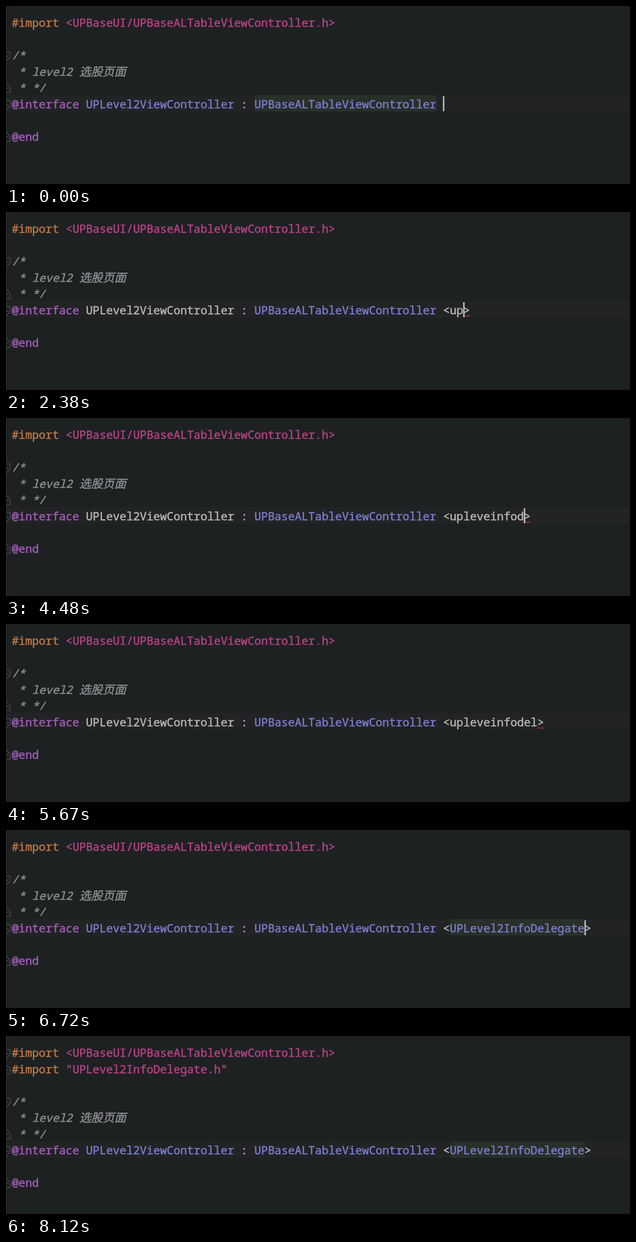
An HTML page for the animation above (8.19 s loop, 1280x367 px).

```html
<!DOCTYPE html>
<html lang="en">
<head>
<meta charset="utf-8">
<title>Code completion</title>
<style>
html, body { margin: 0; width: 100%; height: 100%; overflow: hidden; background: #1e2122; }
svg { display: block; width: 1280px; height: 367px; }
text { font: 23.04px "Noto Sans Mono", "DejaVu Sans Mono", monospace; white-space: pre; stroke-width: 0.6px; }
.comment { font-style: italic; }
.cjk { font: italic 24px "Noto Sans CJK SC", "Noto Sans CJK", sans-serif; }
.hint { font-size: 19.2px; stroke-width: 0.3px; }
.shift { font-family: "DejaVu Sans", sans-serif; font-size: 22px; }
.icon { font-size: 15px; }
</style>
</head>
<body>
<svg id="stage" viewBox="0 0 1280 367"></svg>
<script>
const LOOP = 8190, X0 = 12, CHAR = 13.824, TOP = 16.5, ROW = 33.5;
const C = {
  bg: '#1e2122', line: '#222324', plain: '#b6b6b1', directive: '#bb7846', string: '#b54285',
  keyword: '#a25db8', type: '#7b7bcd', comment: '#8a8b8e', usage: '#293029', fold: '#484b4c',
  popup: '#2c2e30', selected: '#393b3e', match: '#8b4a9c', item: '#96989a'
};
const NAME = 'UPLevel2InfoDelegate', QUERY = 'upleveinfodel';
const OPEN = 770, POPUP = 5810, ACCEPT = 6580, IMPORT = 6790;
// One time for each typed letter of the query
const KEYS = [1960, 2240, 2660, 2870, 3080, 3290, 3570, 3780, 3920, 4130, 4410, 4620, 4970];
const EDITS = [0, OPEN, ...KEYS, ACCEPT];

const stage = document.getElementById('stage');
const esc = s => s.replace(/&/g, '&amp;').replace(/</g, '&lt;');
const col = n => X0 + n * CHAR;
const rowY = n => TOP + n * ROW;
const rect = (x, y, w, h, fill, r = 0) =>
  `<rect x="${x}" y="${y}" width="${w}" height="${h}" rx="${r}" fill="${fill}"/>`;
const path = (d, stroke, width) =>
  `<path d="${d}" fill="none" stroke="${stroke}" stroke-width="${width}"/>`;

// Each part is [text, colour, class]; the thin stroke gives the heavier editor type
const text = (x, y, parts, cls = '') => `<text x="${x}" y="${y}" class="${cls}">` +
  parts.map(([s, color, c = '']) =>
    `<tspan fill="${color}" stroke="${color}" class="${c}">${esc(s)}</tspan>`).join('') + '</text>';
const code = (row, ...parts) => text(X0, rowY(row) + 26.5, parts);

function fold(row, dir) {
  const y = rowY(row) + 20 - (dir > 0 ? 0 : 1);
  return rect(0, y - 10, 8, 20, C.bg) +
    path(`M0 ${y - dir * 9}H8.5V${y + dir * 2}L0 ${y + dir * 10}M0 ${y}H5`, C.fold, 1.5);
}

function popup() {
  // Matching pieces come at even places
  const items = [
    ['UPLeve', 'l2', 'InfoDel', 'egate'],
    ['UPLeve', 'l2', 'Info', 'View', 'Del', 'egate'],
    ['UPLeve', 'l2Strategy', 'Info', 'TableViewDelegate']
  ];
  let out = rect(871, 217, 409, 136, C.popup) + rect(872, 218, 408, 35, C.selected);
  items.forEach((parts, i) => {
    const y = 218 + i * 35.3;
    out += rect(877, y + 4, 27, 27, '#3a536f', 4) +
      text(886, y + 23, [['P', '#1d2c3c']], 'icon') +
      text(910, y + 26.5, parts.map((s, j) => [s, j % 2 ? C.item : C.match]));
  });
  const hint = (x, s, cls = '') => text(x, 343, [[s, '#b4b5b5', cls]], 'hint');
  return out + hint(873, 'Press') + hint(945, '^') + hint(959, '⇧', 'shift') +
    hint(980, 'Space to filter results by pattern');
}

function draw(t) {
  const typed = KEYS.filter(k => t >= k).length;
  const opened = t >= OPEN, accepted = t >= ACCEPT, broken = opened && !accepted;
  const shift = t >= IMPORT ? 1 : 0;
  const row = 5 + shift, y = rowY(row);
  const inner = accepted ? NAME : QUERY.slice(0, typed);
  const caret = opened ? 65 + inner.length : 64;

  let out = rect(0, 0, 1280, 367, C.bg) + rect(0, y, 1280, ROW, C.line);
  if (!opened) out += rect(col(36), y, 27 * CHAR, ROW, C.usage);
  if (accepted) out += rect(col(65), y, NAME.length * CHAR, ROW, C.usage);
  out += rect(0, 0, 1, 367, '#3c3f40');

  if (shift) out += fold(0, 1) + fold(1, -1);
  out += fold(2 + shift, 1) + fold(4 + shift, -1) + fold(row, 1) + fold(7 + shift, -1);

  out += code(0, ['#import ', C.directive], ['<UPBaseUI/UPBaseALTableViewController.h>', C.string]);
  if (shift) out += code(1, ['#import ', C.directive], [`"${NAME}.h"`, C.string]);
  out += code(2 + shift, ['/*', C.comment, 'comment']) +
    code(3 + shift, [' * level2 ', C.comment, 'comment'], ['选股页面', C.comment, 'cjk']) +
    code(4 + shift, [' * */', C.comment, 'comment']) +
    code(row, ['@interface ', C.keyword], ['UPLevel2ViewController', broken ? C.plain : C.type],
      [' : ', C.plain], ['UPBaseALTableViewController ', C.type],
      ...(opened ? [['<', C.plain], [inner, accepted ? C.type : C.plain], ['>', C.plain]] : [])) +
    code(7 + shift, ['@end', C.keyword]);

  if (broken) out += path(`M${col(caret) + 1} ${y + 32}l3 -3l3 3l3 -3l3 3`, '#a8323c', 1.3);
  const lastEdit = EDITS.filter(e => t >= e).pop();
  if ((t - lastEdit) % 1000 < 500) out += rect(col(caret) - 0.5, y + 2, 3, 31, '#bdbdbd');
  if (t >= POPUP && !accepted) out += popup();
  return out;
}

let shown = '';
function tick(now) {
  const next = draw(now % LOOP);
  if (next !== shown) stage.innerHTML = shown = next;
  requestAnimationFrame(tick);
}
tick(performance.now());
</script>
</body>
</html>
```
